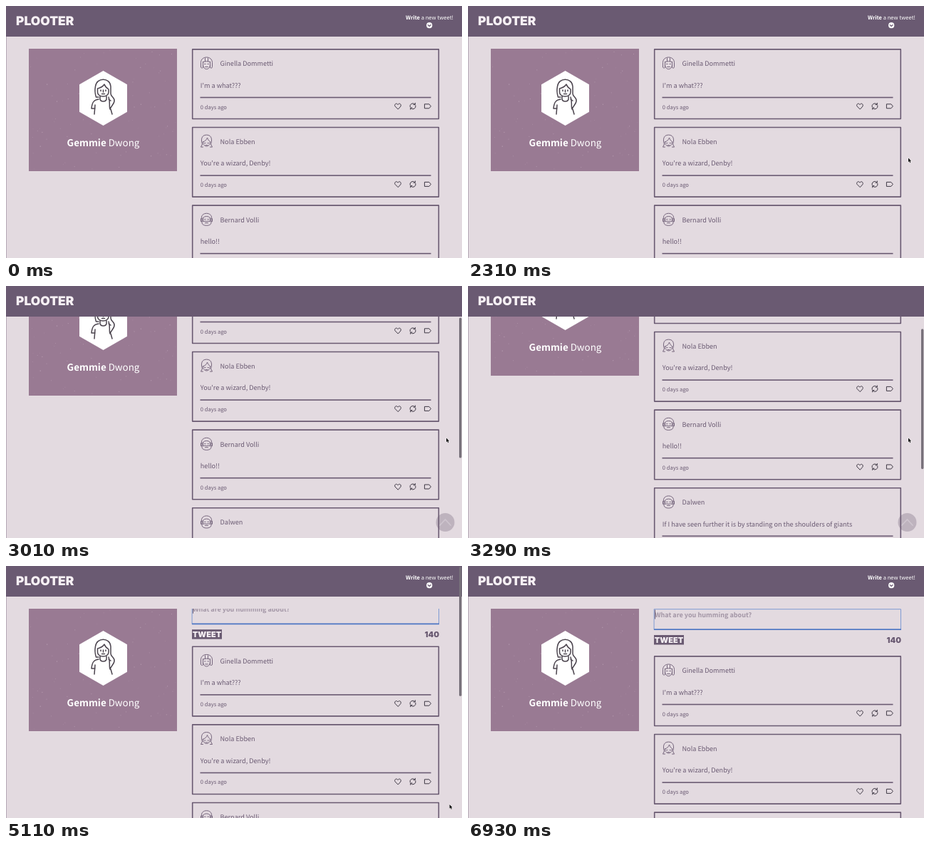
Recreate the animation shown at these times as an HTML page with a canvas. Size 640x354 px, loop 7000 ms.

```html
<!DOCTYPE html>
<html lang="en">
<head>
<meta charset="utf-8">
<title>Feed</title>
<style>
html, body { margin: 0; width: 100%; height: 100%; overflow: hidden; background: #e3dae0; }
canvas { display: block; width: 640px; height: 354px; }
</style>
</head>
<body>
<canvas id="stage"></canvas>
<script>
const W = 640, H = 354, LOOP = 7000, STEP = 70;
const BG = '#e3dae0', DARK = '#6a5a72', PANEL = '#997a93', PALE = '#f6f0f4', INK = '#3f3945';
const SANS = '"Noto Sans CJK JP", "Noto Sans CJK SC", "Noto Sans CJK", "Open Sans", sans-serif';
const BLOCK = 'Inter, "Noto Sans", sans-serif';

const canvas = document.getElementById('stage');
const ratio = window.devicePixelRatio || 1;
canvas.width = W * ratio;
canvas.height = H * ratio;
const ctx = canvas.getContext('2d');

const CARDS = [
  { name: 'Ginella Dommetti', body: "I'm a what???", face: 'bob' },
  { name: 'Nola Ebben', body: "You're a wizard, Denby!", face: 'long' },
  { name: 'Bernard Volli', body: 'hello!!', face: 'beard' },
  { name: 'Dalwen', body: 'If I have seen further it is by standing on the shoulders of giants', face: 'beard' }
];
const CARD_TOP = 60, CARD_GAP = 109.6, FORM_H = 66, FORM_START = 4830;

const SCROLL = [[2310, 0], [2450, 8], [2590, 24], [2730, 43], [3010, 78], [3150, 96], [3290, 106]];
const POINTER_X = [[3570, 618], [4200, 622], [4340, 622.5]];
const POINTER_Y = [[560, 318], [630, 288], [770, 236], [910, 212], [1120, 209], [1190, 210],
  [1680, 211], [1890, 213.5], [3570, 213.5], [3780, 250], [4060, 322], [4200, 333.5], [4340, 335],
  [6160, 335], [6440, 358]];

// Linear path through [time, value] points.
function track(points, t) {
  if (t <= points[0][0]) return points[0][1];
  for (let i = 1; i < points.length; i++) {
    const [t0, a] = points[i - 1], [t1, b] = points[i];
    if (t <= t1) return a + (b - a) * (t - t0) / (t1 - t0);
  }
  return points[points.length - 1][1];
}

const ramp = (t, from, to) => Math.min(1, Math.max(0, (t - from) / (to - from)));
const swing = u => 0.5 - Math.cos(u * Math.PI) / 2;

function randoms(seed) {
  return () => (seed = (seed * 16807) % 2147483647) / 2147483647;
}

function setFont(size, weight, family = SANS) {
  ctx.font = `${weight} ${size}px ${family}`;
  ctx.textRendering = 'geometricPrecision';
}

function text(str, x, y, size, weight, color, family, align = 'left') {
  setFont(size, weight, family);
  ctx.textAlign = align;
  ctx.fillStyle = color;
  ctx.fillText(str, x, y);
  return ctx.measureText(str).width;
}

function rect(x, y, w, h, color) {
  ctx.fillStyle = color;
  ctx.fillRect(x, y, w, h);
}

function disc(x, y, r, color) {
  ctx.beginPath();
  ctx.arc(x, y, r, 0, Math.PI * 2);
  ctx.fillStyle = color;
  ctx.fill();
}

function line(path, color, width) {
  ctx.strokeStyle = color;
  ctx.lineWidth = width;
  ctx.stroke(new Path2D(path));
}

function at(x, y, draw) {
  ctx.save();
  ctx.translate(x, y);
  draw();
  ctx.restore();
}

const FACES = {
  bob: 'M-8 5V-1C-8-11 8-11 8-1V5C8 7 6 7 5 6M-8 5C-8 7-6 7-5 6M-5 5V-2M5 5V-2M-5-2Q0-4 5-2M-2-3V-7M2-3V-7' +
    'M-5 3C-4 10 4 10 5 3M-3 1H-1.6M1.6 1H3M-1.8 5H1.8',
  long: 'M-6 4L-8 8L-5 8M6 4L8 8L5 8M-6 4C-8-1-8-9 0-9C8-9 8-1 6 4M-5.500 1C-2 0 0-2 1-5C2-2 4 0 5.500 1' +
    'M-5 1C-5 9 5 9 5 1M-3 2.500H-1.500M1.500 2.500H3M-1.500 5.500H1.500',
  beard: 'M-7-1C-9-11 9-11 7-1M-5-2C-3-5 3-5 5-2M-7-1H-8V3H-6.500M7-1H8V3H6.500M-6.500-1V5C-6 10 6 10 6.500 5V-1' +
    'M-5-2V2M5-2V2M-5 3Q-2 2 0 3Q2 2 5 3M-3 0H-1.500M1.500 0H3M-2 5H2'
};

function icons(y) {
  at(550, y, () => line('M0 4L-4 0C-5.500-2.500-2-5.500 0-2.200C2-5.500 5.500-2.500 4 0Z', INK, 1));
  at(571, y, () => line('M-3.900 1A4 4 0 0 1 2.600-3M3.900-1A4 4 0 0 1-2.600 3M3.300-4.500V-2.200H1M-3.300 4.500V2.200H-1', INK, 1));
  at(592, y, () => line('M-4.200-3H1.800L4.400 0L1.800 3H-4.200Z', INK, 1));
}

function card({ name, body, face }, y) {
  ctx.strokeStyle = DARK;
  ctx.lineWidth = 1.6;
  ctx.strokeRect(261.700, y + 0.900, 345.600, 97.600);
  at(281.500, y + 20.500, () => line(FACES[face], DARK, 0.9));
  text(name, 300.500, y + 24.300, 9.15, 300, DARK);
  text(body, 272.800, y + 54.800, 9.15, 300, DARK);
  rect(272.500, y + 67.700, 324, 1.6, DARK);
  text('0 days ago', 272.800, y + 84.500, 7.6, 300, DARK);
  icons(y + 80.800);
}

function portrait() {
  ctx.fillStyle = '#fff';
  ctx.fill(new Path2D('M136.500 91L170 110.300V148.700L136.500 168L103 148.700V110.300Z'));
  line('M126.500 128C124.500 122 124.500 118 125.500 113C127 100 146 100 147 113V123' +
    'M128.500 116V121C128.500 129 144 129 144 121V117M128.500 116C133 115 136 113 138 110C139 113 141 115 144 117' +
    'M147 123C147 128 153 128 152 134C151 139 147 141 146 145C144 139 147 135 144 128' +
    'M126.500 128H130M132 127V131C133 135 140 135 141 131V127' +
    'M130 131C124 132 121 134 120 144H125M125 139L124 152M147 145L149 152M144 131L147 133' +
    'M133 118V119.500M140 118V119.500M136.500 118V121M134.500 123.500H138.500', '#4b444e', 1.5);
}

function profile() {
  rect(32, 60, 208, 172, PANEL);
  const rnd = randoms(77);
  for (let i = 0; i < 110; i++) {
    const x = 33 + rnd() * 205, y = 61 + rnd() * 169, s = 0.5 + rnd() * 0.8;
    rect(x, y, s, s, `rgba(226,205,220,${0.12 + rnd() * 0.3})`);
  }
  portrait();
  const first = 'Gemmie', last = ' Dwong', size = 13.4;
  setFont(size, 700);
  const a = ctx.measureText(first).width;
  setFont(size, 300);
  const x = 136.500 - (a + ctx.measureText(last).width) / 2;
  text(first, x, 196.500, size, 700, '#fff');
  text(last, x + a, 196.500, size, 300, '#fff');
}

function form(p, caret) {
  ctx.save();
  ctx.beginPath();
  ctx.rect(255, 60, 360, FORM_H * p);
  ctx.clip();
  ctx.translate(0, -38 * (1 - p));
  ctx.strokeStyle = '#7f9bd3';
  ctx.lineWidth = 1;
  ctx.strokeRect(261.500, 60.700, 346, 28.800);
  rect(261, 88.300, 347, 1.7, '#4f77c4');
  text('What are you humming about?', 262.200, 71.500, 9.05, 700, '#a295a5');
  if (caret) rect(262, 61.500, 1, 13, DARK);
  rect(261, 97, 42, 13.500, DARK);
  text('TWEET', 282, 107.800, 11, 900, PALE, BLOCK, 'center');
  text('140', 608, 107.600, 11, 900, DARK, BLOCK, 'right');
  ctx.restore();
}

function header(navAlpha) {
  rect(0, 0, W, 43, DARK);
  text('PLOOTER', 14, 26.800, 17.4, 900, PALE, BLOCK);
  if (!navAlpha) return;
  ctx.globalAlpha = navAlpha;
  const w = text('Write', 561, 19, 7.6, 700, '#fff');
  text(' a new tweet!', 561 + w, 19, 7.6, 300, '#fff');
  disc(594.200, 27.200, 4.1, '#fff');
  line('M592.200 26.500L594.200 28.500L596.200 26.500', DARK, 1.1);
  ctx.globalAlpha = 1;
}

function upButton(alpha) {
  ctx.save();
  ctx.globalAlpha = alpha;
  disc(616.500, 332, 13, DARK);
  line('M609 336L616.500 328L624 336', PALE, 1.8);
  ctx.restore();
}

function scrollbar(y, h, alpha) {
  ctx.globalAlpha = alpha;
  ctx.beginPath();
  ctx.roundRect(636, y, 3.400, h, 1.7);
  ctx.fillStyle = '#77707a';
  ctx.fill();
  ctx.globalAlpha = 1;
}

function pointer(x, y) {
  at(x, y, () => {
    const arrow = new Path2D('M0 0V5.800L1.300 4.600L2.300 6.700L3.300 6.200L2.400 4.200H4.100Z');
    ctx.strokeStyle = 'rgba(255,255,255,.8)';
    ctx.lineWidth = 0.8;
    ctx.stroke(arrow);
    ctx.fillStyle = '#111';
    ctx.fill(arrow);
  });
}

function render(t) {
  const atTop = t > FORM_START;
  const scroll = atTop ? 0 : track(SCROLL, t);
  const open = swing(ramp(t, FORM_START, FORM_START + 400));
  const away = atTop ? 0 : ramp(t, 2310, 2520);
  const px = track(POINTER_X, t), py = track(POINTER_Y, t);

  ctx.setTransform(ratio, 0, 0, ratio, 0, 0);
  ctx.lineCap = ctx.lineJoin = 'round';
  rect(0, 0, W, H, BG);

  at(0, -scroll, () => {
    profile();
    if (open > 0) form(open, Math.floor((t - 4900) / 500) % 2 === 0);
    CARDS.forEach((c, i) => {
      const y = CARD_TOP + FORM_H * open + i * CARD_GAP;
      if (y - scroll < H) card(c, y);
    });
  });

  rect(0, 43, 0.6, H - 43, 'rgba(106,90,114,.6)');
  header(1 - away);
  if (away > 0) upButton(away * (py > 319 ? 1 : 0.3));

  const bar = atTop ? 1 - ramp(t, 5530, 5740) : ramp(t, 2310, 2450) * (1 - ramp(t, 3570, 3850));
  if (bar > 0) {
    const total = 633 + FORM_H * open;
    scrollbar(1 + scroll * H / total, H * H / total - 1, bar);
  }
  if (t >= 560 && py < H) pointer(px, py);
}

function loop(now) {
  render(Math.floor((now % LOOP) / STEP) * STEP);
  requestAnimationFrame(loop);
}
requestAnimationFrame(loop);
</script>
</body>
</html>
```
